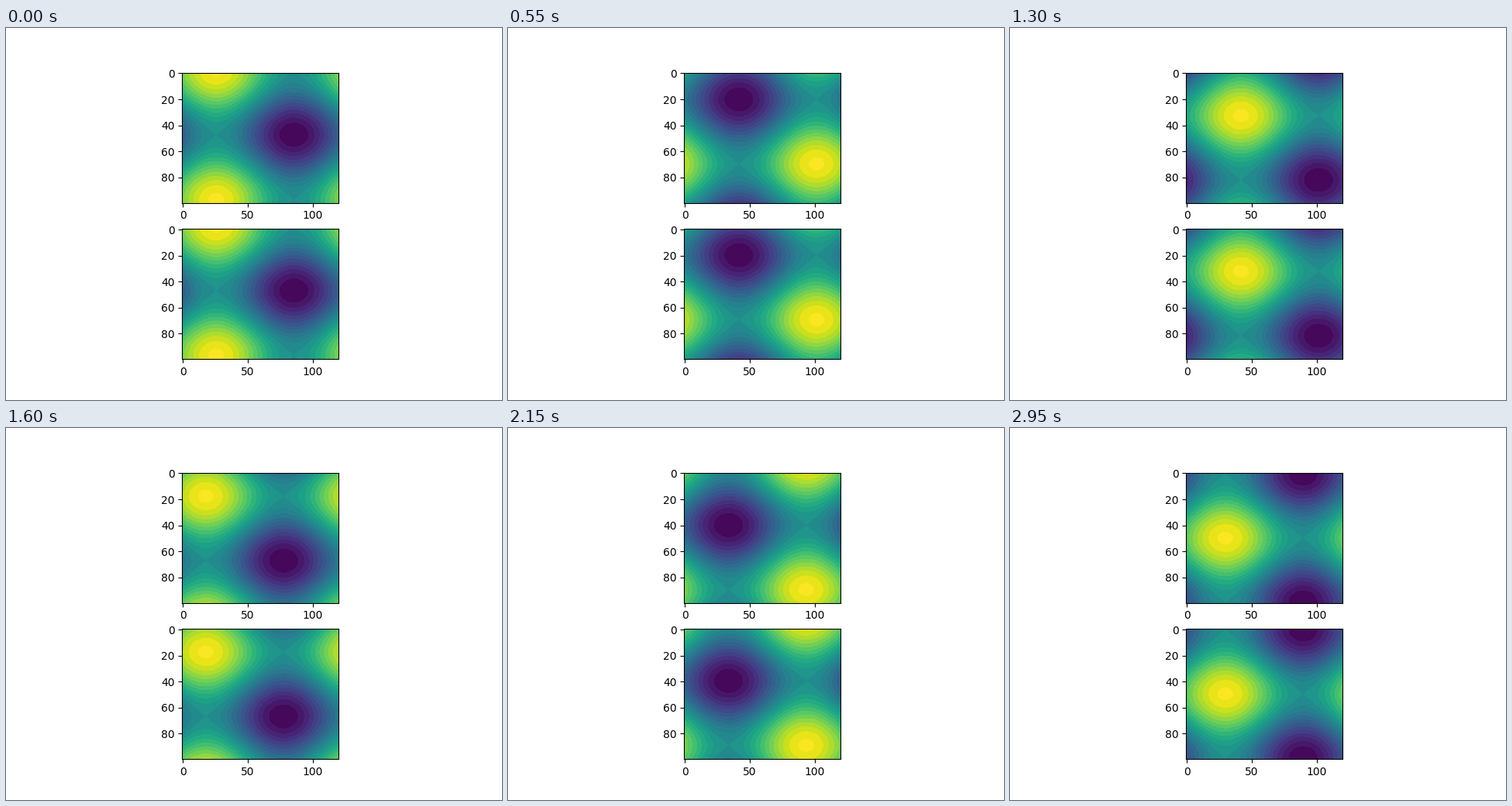
Write a matplotlib script that moves like this. It is 640 by 480 pixels and loops after 3 s.

```python
import numpy as np
import matplotlib.pyplot as plt
from matplotlib.animation import FuncAnimation
from matplotlib.colors import BoundaryNorm, ListedColormap

FRAMES = 60
INTERVAL = 50

x = np.linspace(0, 2 * np.pi, 120)
y = np.linspace(0, 2 * np.pi, 100).reshape(-1, 1)


def wave(step):
    return np.sin(x + step * np.pi / 15) + np.cos(y + step * np.pi / 20)


# Banded viridis, with one band edge on the saddle level at zero
edges = np.concatenate([np.linspace(-2, 0, 13), np.linspace(0, 1.95, 12)[1:], [2]])
mids = (edges[:-1] + edges[1:]) / 2
cmap = ListedColormap(plt.get_cmap("viridis")((mids + 2) / 4))
norm = BoundaryNorm(edges, cmap.N)

fig, axes = plt.subplots(2, figsize=(6.4, 4.8), dpi=100)
images = [ax.imshow(wave(1), cmap=cmap, norm=norm) for ax in axes]


def update(frame):
    field = wave(frame + 1)
    for image in images:
        image.set_data(field)
    return images


anim = FuncAnimation(fig, update, frames=FRAMES, interval=INTERVAL,
                     repeat=True, repeat_delay=0, blit=False)
plt.show()
```
